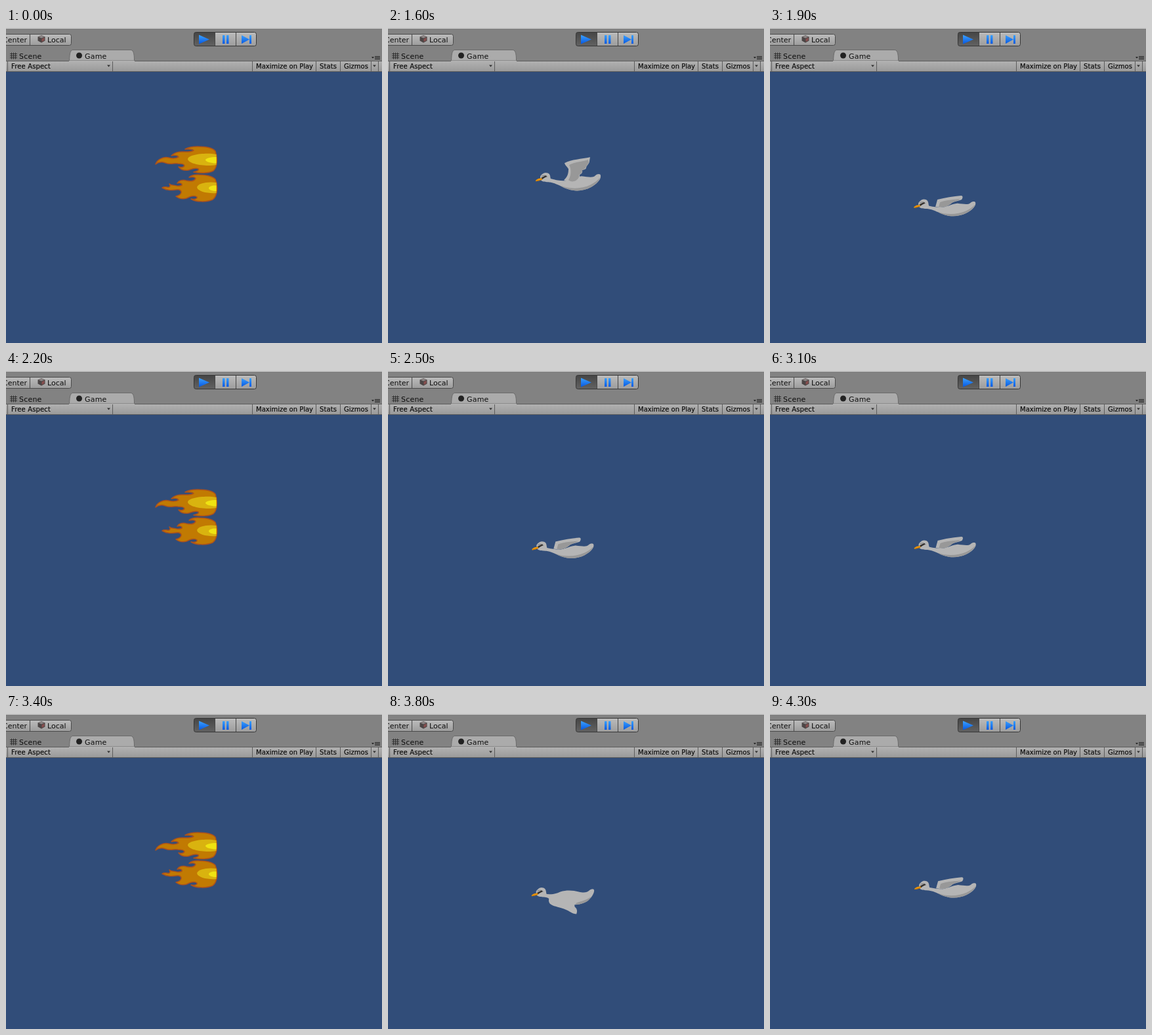
Write an HTML page that moves like this. It is 573 px wide and 481 px high and loops after 4400 ms.

```html
<!DOCTYPE html>
<html lang="en">
<head>
<meta charset="utf-8">
<title>Sprite preview</title>
<style>
  html, body { margin: 0; width: 100%; height: 100%; overflow: hidden; background: #314d79; }
  svg { display: block; width: 573px; height: 481px; }
  text { font: 11px "DejaVu Sans", sans-serif; fill: #0c0c0c; }
  .small text { font-size: 10px; stroke: #0c0c0c; stroke-width: .2px; }
  .line { stroke: #5c5c5c; fill: none; }
  .flame { fill: #c17a02; stroke: #ad521b; stroke-width: 1.5; stroke-linejoin: round; }
  .glow { fill: #d9b30f; }
  .core { fill: #efe312; }
  .light { fill: #b5b5b5; }
  .shade { fill: #989898; }
</style>
</head>
<body>
<svg viewBox="0 0 573 481">
  <defs>
    <linearGradient id="bar" x2="0" y2="1"><stop stop-color="#b2b2b2"/><stop offset="1" stop-color="#999"/></linearGradient>
    <linearGradient id="button" x2="0" y2="1"><stop stop-color="#bcbcbc"/><stop offset="1" stop-color="#9c9c9c"/></linearGradient>
    <linearGradient id="pressed" x2="0" y2="1"><stop stop-color="#454545"/><stop offset="1" stop-color="#626262"/></linearGradient>
    <linearGradient id="blue" x2="0" y2="1"><stop stop-color="#3ba2ff"/><stop offset="1" stop-color="#0757e0"/></linearGradient>
  </defs>

  <rect width="573" height="481" fill="#314d79"/>
  <rect width="573" height="67" fill="#828282"/>
  <path d="M0 .5H573" stroke="#d2d2d2"/>

  <!-- handle buttons -->
  <rect x="-10.5" y="9.5" width="110" height="17" rx="3" fill="url(#button)" stroke="#4a4a4a"/>
  <path d="M36.5 10V26" stroke="#4a4a4a"/>
  <text x="-5" y="22">Center</text>
  <text x="63" y="22">Local</text>
  <path d="M54 11L59.500 13.500V19.500L54 22.500L48.500 19.500V13.500Z" fill="#4b4646"/>
  <path d="M54 11.500L58.500 13.500L54 15.500L49.500 13.500Z" fill="#8f8888"/>
  <path d="M54.500 16.500L58.500 14.500V19L54.500 21Z" fill="#874e4e"/>

  <!-- transport buttons -->
  <rect x="286.5" y="6.500" width="95" height="21" rx="3" fill="url(#button)"/>
  <path d="M289 6.500H318V27.500H289Q286.500 27.500 286.500 25V9Q286.500 6.500 289 6.500Z" fill="url(#pressed)"/>
  <rect x="286.5" y="6.500" width="95" height="21" rx="3" fill="none" stroke="#363636"/>
  <path d="M318.500 7V27M350.500 7V27" stroke="#484848"/>
  <path d="M294 10.500L310 17.500L294 24.500ZM330 11H333.500V24H330ZM336 11H339.500V24H336ZM359 11L371 17.500L359 24ZM371 11H374V24H371Z" fill="url(#blue)"/>

  <!-- tabs -->
  <path d="M96.500 50C97 42 97 33.500 102 33.500H190C195 33.500 195.500 42 195.500 50Z" fill="#ababab" stroke="#6a6a6a"/>
  <path d="M8.500 37.500V47.500M11.500 37.500V47.500M14.500 37.500V47.500M6 39.500H17M6 42.500H17M6 45.500H17" stroke="#2b2b2b" stroke-width=".9"/>
  <text x="20" y="47" letter-spacing=".2">Scene</text>
  <circle cx="111.5" cy="42" r="4.500" fill="#222"/>
  <text x="120" y="47" letter-spacing=".2">Game</text>
  <path d="M557 44H561L559 46.500Z" fill="#222"/>
  <path d="M562 43.500H570M562 45.500H570M562 47.500H570" stroke="#222"/>

  <!-- view options -->
  <rect y="50" width="573" height="17" fill="url(#bar)"/>
  <path class="line" d="M0 50.500H96M196 50.500H573M0 66.500H573M2.500 51V66M162.500 51V66M375.500 51V66M472.500 51V66M509.500 51V66M556.500 51V66M567.500 51V66"/>
  <g class="small">
    <text x="8" y="62" letter-spacing=".15">Free Aspect</text>
    <text x="381" y="62">Maximize on Play</text>
    <text x="478" y="62" letter-spacing=".1">Stats</text>
    <text x="515" y="62">Gizmos</text>
  </g>
  <path d="M154 56.500H159L156.500 59.500ZM559 56.500H564L561.500 59.500Z" fill="#333"/>

  <g id="flames">
    <path class="flame" d="M319 188C314 182 303 181 292 181C284 181 278 182 273 185C279 185 284 184 286 187C281 190 273 189 268 189C261 189 256 191 252 195C256 194 262 194 263 197C258 200 252 199 248 198C240 196 230 201 228 208C233 204 238 204 243 206C250 209 256 206 262 207C266 207 271 207 272 210C271 213 267 213 263 212C266 216 272 218 278 217C284 215 288 213 293 215C295 217 291 219 286 220C295 222 309 222 316 218C323 212 322 196 319 188Z"/>
    <path class="glow" d="M320.500 193C305 190 278 193 277 200C278 208 304 212 320.500 209Z"/>
    <path class="core" d="M320.500 197C312 197 304 199 304 201.500C304 204 312 206.500 320.500 206.500Z"/>
    <path class="flame" d="M319 231C313 225 300 224 292 224C286 224 282 225 279 228C284 227 288 227 289 230C286 235 279 234 275 233C269 231 263 233 261 237C265 236 269 237 268 240C263 243 258 240 254 240C251 240 250 239 249 238C251 241 250 244 246 243C243 243 240 242 238 244C241 245 243 247 247 247C252 249 258 246 264 247C269 249 268 255 259 257C263 260 268 262 275 260C281 257 287 255 291 258C292 261 287 262 282 261C290 266 306 266 315 262C323 256 323 240 319 231Z"/>
    <path class="glow" d="M320.500 236C308 234 292 237 291 243C292 250 308 253 320.500 252Z"/>
    <path class="core" d="M320.500 240.500C314 240 309 242 309 244.500C309 247 314 249 320.500 249Z"/>
  </g>

  <!-- swan, placed by the tip of its beak -->
  <g id="swan">
    <path id="body" class="light"/>
    <path id="belly" class="shade"/>
    <path id="wing" class="light"/>
    <path id="feathers" class="shade"/>
    <path class="light" d="M8 -3C6 -5 7 -8 10 -10C12 -13 18 -13.500 21 -10C23 -7 22 -3 24 -1L21 2C17 2 10 2 8 -1Z"/>
    <path d="M9 -7C13 -9 16 -8 18 -6" stroke="#777" fill="none"/>
    <path d="M8 -4C10 -6 13 -7 16 -8L17 -6C14 -5 12 -4 10 -2Z" fill="#33302e"/>
    <path d="M0 -.5C2 -3 6 -4 9.500 -4L10 -1.500C7 -.5 3 1 .5 .8Z" fill="#ee960a"/>
    <path d="M1 .3C4 0 7 -1 9.500 -2" stroke="#a3600c" stroke-width=".7" fill="none"/>
  </g>
</svg>
<script>
const $ = id => document.getElementById(id);
const LOOP = 4400, HOLD = 1600, STEP = 100, FLAP = 610;

const glide = {
  body: "M20 -4C30 -1 38 0 46 0C55 -2 62 -6 70 -7C80 -6 87 -4 91 -8C94 -11 99 -11 99 -8C100 -2 93 5 84 10C74 15 62 17 50 13C38 9 34 4 20 2Z",
  belly: "M38 7C50 13 70 13 84 6C90 3 95 -1 98 -5C97 0 92 5 84 10C74 15 62 17 50 13C44 11 40 9 38 7Z"
};
const arch = {
  body: "M20 -3C30 -1 38 -3 44 -6C54 -9 64 -8 72 -6C80 -4 85 -5 88 -8C92 -11 96 -11 95.500 -7C95 -2 89 7 82 10C74 14 66 14 56 14L28 8C27 5 27 3 20 2Z",
  belly: "M67 13C68 9 82 9 91 1C88 7 84 10 79 11C75 13 70 14 67 13Z"
};

// Each pose holds until the given time of the wing beat.
const poses = [
  { until: 130, shape: glide, scale: [1, 1],
    wing: "M44 -27C55 -33 70 -33 83 -36L82 -30C82 -26 78 -24 77 -20C77 -17 73 -17 71 -16C72 -12 69 -10 67 -9C68 -6 66 -3 62 1C56 3 48 2 43 -1C49 -6 50 -12 50 -18C48 -22 45 -23 44 -27Z",
    feathers: "M51 -24C60 -29 71 -29 80 -32L81 -28C79 -25 78 -23 76 -20C76 -18 72 -17 71 -16C71 -12 68 -10 66 -9C67 -6 65 -3 61 0C56 2 53 1 50 -1C54 -8 55 -17 51 -24Z" },
  { until: 220, shape: glide, scale: [.97, .95],
    wing: "M38 -21C51 -26 66 -26 79 -29C82 -28 80 -24 78 -21C76 -17 71 -17 69 -14C69 -10 63 -9 62 -6C58 -1 48 2 39 0C43 -5 43 -12 41 -16Z",
    feathers: "M46 -18C56 -22 68 -22 77 -24C77 -20 71 -18 68 -14C67 -10 63 -9 61 -6C57 -1 51 0 44 -1C48 -6 49 -13 46 -18Z" },
  { until: 310, shape: glide, scale: [.95, .88],
    wing: "M33 -1L36 -12C48 -15 60 -17 72 -18C75 -18 75 -15 73 -12C68 -10 64 -10 58 -7C54 -3 47 0 40 0Z",
    feathers: "M40 -8C50 -12 62 -12 71 -13C67 -10 63 -10 58 -7C54 -3 46 1 38 -1Z" },
  { until: 385, shape: arch, scale: [1, 1],
    wing: "M27 4C36 0 54 0 67 7C66 10 65 13 66 17C70 20 70 24 68.500 28C64 28 60 25 54 22C45 18 34 17 28 12C26 9 26 7 27 4Z",
    feathers: "" },
  { until: 450, shape: arch, scale: [1, 1],
    wing: "M36 2C46 -2 59 0 68 6C66 12 68 17 71 21C73 26 74 32 72 38C67 38 62 34 57 31C52 27 48 27 45 22C40 17 36 10 36 2Z",
    feathers: "" },
  { until: 530, shape: arch, scale: [1, 1],
    wing: "M38 2C48 -2 62 0 69 6C68 11 72 16 77 21C80 25 80 29 77 31C70 31 65 27 59 24C51 21 42 14 38 2Z",
    feathers: "" }
];

function showSwan(beat) {
  const pose = poses.find(p => beat < p.until);
  const lift = Math.cos((beat - 50) / FLAP * 2 * Math.PI);
  const y = 254 - 23.7 * lift;
  const x = 225 - (y - 233.4) * .145;
  $("swan").setAttribute("transform", `translate(${x} ${y})`);
  for (const part of ["body", "belly"]) {
    $(part).setAttribute("d", pose.shape[part]);
    $(part).setAttribute("transform", `scale(${pose.scale})`);
  }
  for (const part of ["wing", "feathers"]) $(part).setAttribute("d", pose[part]);
}

function draw() {
  const t = performance.now() % LOOP;
  const beat = Math.floor((t - HOLD) / STEP) * STEP % FLAP;
  const flying = t >= HOLD && beat < 530;
  $("flames").style.display = flying ? "none" : "";
  $("swan").style.display = flying ? "" : "none";
  if (flying) showSwan(beat);
  requestAnimationFrame(draw);
}
draw();
</script>
</body>
</html>
```
